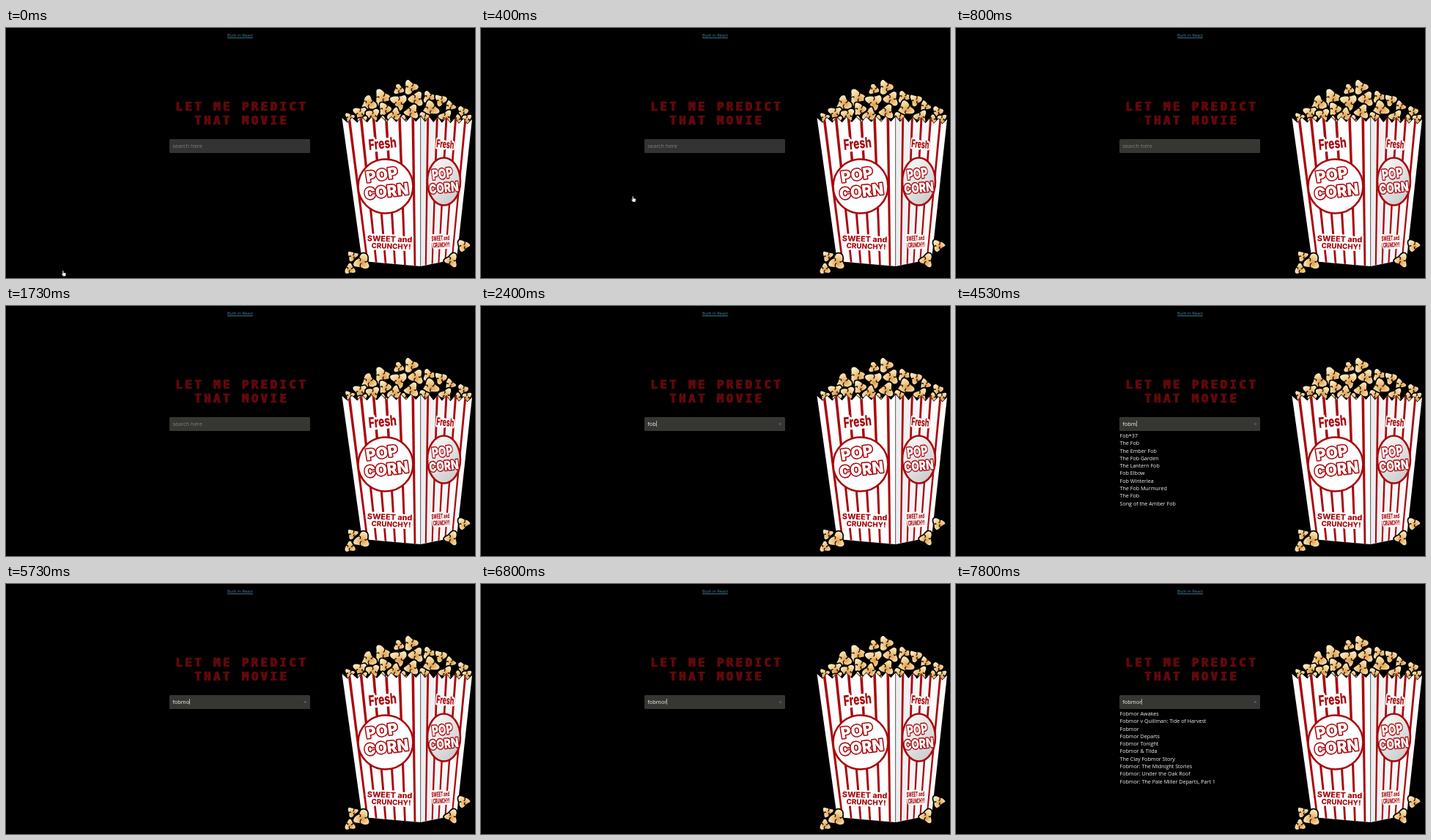
These frames come from a looping animation (640x342 px, 8000 ms). An HTML page:

```html
<!DOCTYPE html>
<html lang="en">
<head>
<meta charset="utf-8">
<title>Movie search</title>
<style>
  html, body { margin: 0; width: 100%; height: 100%; overflow: hidden; background: #000; }
  #stage { position: relative; width: 640px; height: 342px; overflow: hidden; background: #000;
    font-family: "Open Sans", "Noto Sans", sans-serif; color: #f4f4f4; }
  #stage > * { position: absolute; }
  svg { left: 0; top: 0; }
  .link { left: 0; width: 639px; top: 4.4px; text-align: center; font-size: 5.75px; line-height: 12px;
    color: #4a8ca6; text-decoration: underline .6px #3a7086; }
  h1 { left: 121px; width: 402px; top: 99px; margin: 0; text-align: center; color: #62090c;
    font: bold 15.4px/18.7px "DejaVu Sans Mono", monospace; letter-spacing: 3.65px;
    -webkit-text-stroke: .7px #62090c; text-shadow: .7px 0 #62090c, -.7px 0 #62090c; white-space: pre; }
  #field { left: 223px; top: 152px; width: 192px; height: 19px; border-radius: 1.5px;
    background: #333; font-size: 7.45px; line-height: 18.5px; white-space: pre; }
  #field > * { position: absolute; top: 0; }
  #hint, #typed { left: 4.3px; }
  #hint { color: #80807c; }
  #caret { display: inline-block; width: .5px; height: 8px; vertical-align: -1.4px; background: #aaa; }
  #clear { right: 4.5px; color: #3a7fb4; font-weight: 600; }
  #list { left: 223.5px; top: 172px; font-size: 7.15px; line-height: 10.3px; white-space: pre; }
</style>
</head>
<body>
<div id="stage">
  <div class="link">Built in React</div>
  <h1>LET ME PREDICT
THAT MOVIE</h1>
  <div id="field">
    <span id="hint">search here</span>
    <span id="typed"><span id="word"></span><span id="caret"></span></span>
    <span id="clear">×</span>
  </div>
  <div id="list"></div>
  <svg id="art" width="640" height="342" viewBox="0 0 640 342">
    <defs>
      <radialGradient id="corn" cx=".55" cy=".6" r=".6">
        <stop offset="0" stop-color="#dc9c50"/><stop offset=".5" stop-color="#f3cb8a"/>
        <stop offset="1" stop-color="#fdeecb"/>
      </radialGradient>
      <linearGradient id="shade">
        <stop offset="0" stop-color="#ececee"/><stop offset=".5" stop-color="#f8f8f8"/>
        <stop offset="1" stop-color="#fff"/>
      </linearGradient>
      <linearGradient id="dim" x2=".8" y2="1">
        <stop offset="0" stop-color="#fff"/><stop offset="1" stop-color="#c9c9cb"/>
      </linearGradient>
    </defs>
  </svg>
  <svg id="hand" width="8" height="10" viewBox="0 0 8 10">
    <path d="M2.2 5.2V1.2q.7-.9 1.3 0v2.5l2.6.6q.8.3.7 1.2L6.2 8.6H3L.8 5.8q.3-1 1.4-.1z"
      fill="#fff" stroke="#333" stroke-width=".4"/>
  </svg>
</div>
<script>
const $ = id => document.getElementById(id);
const art = $("art"), RED = "#a9080d";

function add(tag, attrs, parent = art, text = "") {
  const el = document.createElementNS("http://www.w3.org/2000/svg", tag);
  for (const k in attrs) el.setAttribute(k, attrs[k]);
  el.textContent = text;
  parent.append(el);
  return el;
}

let seed = 11;
const rnd = () => (seed = seed * 16807 % 2147483647) / 2147483647;

// One popped kernel: a wavy three-lobed blob with dark creases
function kernel(x, y, r) {
  const turn = rnd() * 6.28, pts = [], N = 14;
  for (let i = 0; i < N; i++) {
    const a = i / N * 2 * Math.PI;
    const d = r * (.82 + .24 * Math.cos(3 * a + turn) + (rnd() - .5) * .2);
    pts.push([x + Math.cos(a) * d, y + Math.sin(a) * d]);
  }
  const mid = i => pts[i % N].map((p, k) => (p + pts[(i + 1) % N][k]) / 2);
  let d = "M" + mid(N - 1);
  for (let i = 0; i < N; i++) d += `Q${pts[i]} ${mid(i)}`;
  add("path", { d: d + "Z", fill: "url(#corn)", stroke: "#000", "stroke-width": 1.7 });
  for (let i = 0; i < 3; i++) {
    const a = (Math.PI * (2 * i + 1) - turn) / 3, c = Math.cos(a) * r, s = Math.sin(a) * r;
    add("path", { d: `M${x + c * .62} ${y + s * .62}q${-c * .35 - s * .2} ${-s * .35 + c * .2} ${-c * .3} ${-s * .45}`,
      fill: "none", stroke: "#1c0e02", "stroke-width": 1.3, "stroke-linecap": "round" });
  }
}

// Heap: kernels under a rounded outline
[[552, 81, 12], [536, 84, 9], [513, 95, 13], [495, 103, 12], [577, 94, 10], [593, 99, 10],
 [560, 97, 12], [536, 101, 13], [517, 111, 11], [483, 116, 11], [469, 122, 8], [606, 107, 9],
 [579, 111, 13], [623, 114, 9], [629, 124, 8], [501, 119, 11], [531, 119, 12], [554, 115, 12],
 [600, 121, 11], [570, 122, 9], [616, 125, 8], [542, 126, 8], [515, 127, 8], [487, 127, 8]
].forEach(k => kernel(...k));

// Point on a carton side; corners in the order TL, TR, BL, BR
const at = (c, u, v) => [0, 1].map(i =>
  (c[0][i] * (1 - u) + c[1][i] * u) * (1 - v) + (c[2][i] * (1 - u) + c[3][i] * u) * v);

function side(id, c, teeth, stripes, w, fill) {
  const edge = [];
  for (let i = 0; i <= teeth * 2; i++) edge.push(at(c, i / teeth / 2, i % 2 ? .035 : 0));
  const points = [...edge, c[3], c[2]].join(" ");
  add("polygon", { points }, add("clipPath", { id }));
  add("polygon", { points, fill, stroke: "#000", "stroke-width": 1.4, "paint-order": "stroke" });
  const g = add("g", { "clip-path": `url(#${id})`, fill: RED });
  for (const u of stripes)
    add("polygon", { points: [at(c, u - w, 0), at(c, u + w, 0), at(c, u + w, 1), at(c, u - w, 1)].join(" ") }, g);
}

const front = [[458.5, 123], [566, 121], [486, 319], [566, 326]];
const flank = [[566, 121], [636, 125], [566, 326], [615, 316]];
side("front", front, 8, [.09, .24, .4, .56, .73, .9], .017, "#fff");
side("flank", flank, 6, [.14, .32, .5, .68, .87], .021, "url(#shade)");
add("path", { d: "M566 122V326", stroke: "#b4b4b6", "stroke-width": .7 });

function badge(cx, cy, rx, ry, fill) {
  add("ellipse", { cx, cy, rx, ry, fill, stroke: RED, "stroke-width": 2.6 });
}
badge(518, 216.5, 37.5, 37, "#fff");
badge(597.5, 210, 22.5, 32.5, "url(#dim)");

// Lettering lies on its side of the carton, so the flank copy is foreshortened
function label(text, x, y, size, turn, sx, sy, bubble) {
  add("text", {
    transform: `translate(${x} ${y}) rotate(${turn}) scale(${sx} ${sy})`,
    "text-anchor": "middle", "font-family": "Inter, Lato, sans-serif",
    "font-size": size, "font-weight": bubble ? 900 : 800,
    fill: bubble ? "#fff" : RED, stroke: bubble ? RED : "#fff",
    "stroke-width": bubble ? 3 : 5, "stroke-linejoin": "round", "paint-order": "stroke"
  }, art, text);
}
label("Fresh", 514.5, 165, 16, -6, .86, 1.25);
label("POP", 514, 208, 21, -9, 1, 1, true);
label("CORN", 520, 231, 20.5, -7, 1, 1.05, true);
label("SWEET and", 523.5, 292.5, 10.8, 2, 1, 1);
label("CRUNCHY!", 525.5, 302, 9.8, 2, 1, 1);
label("Fresh", 599, 164, 15, 5, .58, 1);
label("POP", 596, 206, 20, -7, .68, .95, true);
label("CORN", 598, 225, 19, -6, .72, .95, true);
label("SWEET and", 593, 291, 9.6, -3, .45, 1);
label("CRUNCHY!", 594.5, 300, 9.4, -3, .45, 1);

[[473, 312, 9], [469, 330, 9], [486, 320, 13], [624, 298, 10], [608, 318, 11]].forEach(k => kernel(...k));

const shortList = ["Fob*37", "The Fob", "The Ember Fob", "The Fob Garden", "The Lantern Fob", "Fob Elbow",
  "Fob Winterlea", "The Fob Murmured", "The Fob", "Song of the Amber Fob"].join("\n");
const longList = ["Fobmor Awakes", "Fobmor v Quillman: Tide of Harvest", "Fobmor", "Fobmor Departs",
  "Fobmor Tonight", "Fobmor & Tilda", "The Clay Fobmor Story", "Fobmor: The Midnight Stories",
  "Fobmor: Under the Oak Roof", "Fobmor: The Pale Miller Departs, Part 1"].join("\n");

const LOOP = 8000, BLINK = 530, HOVER = 665, FOCUS = 1200;
const keys = [[FOCUS, ""], [2130, "f"], [2260, "fo"], [2400, "fob"], [4530, "fobm"], [4660, "fobmo"], [6730, "fobmor"]];
const lists = [[0, ""], [2660, shortList], [4930, ""], [7060, longList]];
const last = (steps, t) => steps.filter(s => s[0] <= t).pop();
const show = (el, on) => el.style.visibility = on ? "visible" : "hidden";
const put = (el, s) => { if (el.textContent !== s) el.textContent = s; };

function draw(t) {
  const [since, word] = last(keys, t) || [0, ""];
  put($("word"), word);
  put($("list"), last(lists, t)[1]);
  show($("hint"), !word);
  show($("clear"), word);
  show($("caret"), t >= FOCUS && Math.floor((t - since) / BLINK) % 2 == 0);
  $("field").style.background = t < HOVER ? "#333" : "#363732";

  const p = Math.min(1, Math.max(0, (t - 60) / 600)), e = p * p * (3 - 2 * p);
  $("hand").style.transform = `translate(${75 + 215 * e}px, ${331 - 169 * e}px)`;
  show($("hand"), e < .96);
}

const start = performance.now();
function tick() {
  draw((performance.now() - start) % LOOP);
  requestAnimationFrame(tick);
}
tick();
</script>
</body>
</html>
```
